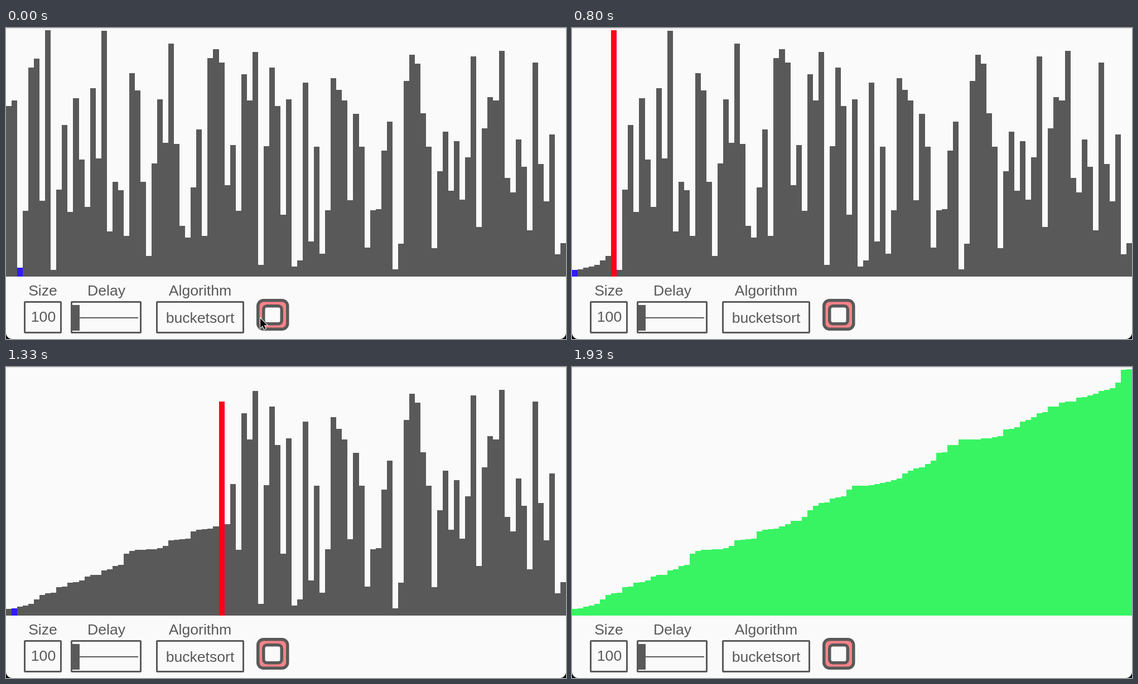
These frames come from a looping animation (1004x558 px, 2560 ms). An HTML page with a canvas:

```html
<!DOCTYPE html>
<html lang="en">
<head>
<meta charset="utf-8">
<title>Bucket sort</title>
<style>
  html, body { margin: 0; overflow: hidden; background: #000; }
  canvas { display: block; }
</style>
</head>
<body>
<canvas id="stage" width="1004" height="558"></canvas>
<script>
const ctx = document.getElementById('stage').getContext('2d');
const LOOP = 2560, DONE = 1930, FLOOR = 446, BAR = 10.04, MAX = 442, BUCKETS = 4;
const PAPER = '#fafafa', GREY = '#595959', BLUE = '#301bff', RED = '#ff0019', GREEN = '#38f463', PINK = '#ff8289';

// Top edge of each bar before sorting
const unsorted = [
  140, 130, 430, 328, 71, 55, 310, 4, 434, 290, 174, 330, 126, 236, 321, 108, 234, 5, 365, 276,
  291, 373, 81, 112, 276, 409, 243, 128, 206, 28, 208, 355, 376, 286, 182, 373, 54, 38, 62, 282,
  210, 328, 83, 130, 43, 425, 212, 71, 140, 335, 128, 428, 417, 98, 383, 213, 405, 327, 90, 111,
  130, 309, 154, 213, 394, 327, 325, 220, 168, 433, 387, 95, 48, 64, 153, 213, 395, 257, 186, 292,
  203, 308, 232, 51, 357, 180, 124, 130, 41, 269, 295, 200, 249, 363, 62, 244, 311, 191, 406, 386
];
const sorted = [...unsorted].sort((a, b) => b - a);
const bucketOf = top => Math.min(BUCKETS - 1, Math.floor((FLOOR - top) * BUCKETS / MAX));

function bar(i, top, color) {
  const x = Math.round(i * BAR);
  ctx.fillStyle = color;
  ctx.fillRect(x, top, Math.round((i + 1) * BAR) - x, FLOOR - top);
}

function drawBars(t) {
  if (t >= DONE) {
    sorted.forEach((top, i) => bar(i, top, GREEN));
    return;
  }
  // Two operations per tick, 30 ticks a second; negative steps fill the buckets
  const tick = Math.floor((t + 5) * 0.03);
  const step = Math.floor(tick * 1.99 - 40.6);
  const tops = unsorted.map((top, i) => i < step ? sorted[i] : top);
  const bucket = bucketOf(step < 0 ? unsorted[Math.min(99, step + 101)] : sorted[step]);
  tops.forEach((top, i) => bar(i, top, i === step ? RED : i === bucket ? BLUE : GREY));
}

function box(x, y, w, h, radius, line, fill) {
  ctx.beginPath();
  ctx.roundRect(x + line / 2, y + line / 2, w - line, h - line, radius);
  ctx.fillStyle = fill;
  ctx.fill();
  ctx.lineWidth = line;
  ctx.strokeStyle = GREY;
  ctx.stroke();
}

function label(text, x, y) {
  ctx.fillStyle = GREY;
  ctx.fillText(text, x, y);
}

function drawControls() {
  ctx.font = '26.6px "Liberation Sans", Arial, sans-serif';
  ctx.textAlign = 'center';
  label('Size', 66, 480);
  label('Delay', 180, 480);
  label('Algorithm', 348, 480);
  box(32, 490, 68, 58, 1, 3, PAPER);
  box(116, 490, 127, 58, 1, 3, PAPER);
  box(269, 490, 158, 58, 1, 3, PAPER);
  label('100', 67, 527);
  label('bucketsort', 348, 529);
  ctx.fillRect(118, 497, 14, 46);
  ctx.fillRect(131, 519, 106, 2);
  box(449, 486, 58.5, 57, 10, 5.5, PINK);
  box(459, 496, 38, 37.5, 6, 5.5, PAPER);
}

function drawCursor(t) {
  const p = Math.max(0, (t - 50) / 250);
  if (p >= 1) return;
  ctx.save();
  ctx.translate(456 - 8 * p, 521 + 40 * p);
  const arrow = new Path2D('M0 0V17L4 13.3L6.8 19.6L9.6 18.3L6.8 12.2H12.2Z');
  ctx.lineWidth = 2;
  ctx.strokeStyle = '#fff';
  ctx.stroke(arrow);
  ctx.fillStyle = '#000';
  ctx.fill(arrow);
  ctx.restore();
}

function draw(t) {
  ctx.clearRect(0, 0, 1004, 558);
  ctx.save();
  ctx.beginPath();
  ctx.roundRect(0, 0, 1004, 558, [0, 0, 11, 11]);
  ctx.clip();
  ctx.fillStyle = PAPER;
  ctx.fillRect(0, 0, 1004, 558);
  ctx.fillStyle = '#d8d8d8';
  ctx.fillRect(0, 0, 1004, 1);
  drawBars(t);
  drawControls();
  drawCursor(t);
  ctx.restore();
}

function loop() {
  draw(performance.now() % LOOP);
  requestAnimationFrame(loop);
}
loop();
</script>
</body>
</html>
```
